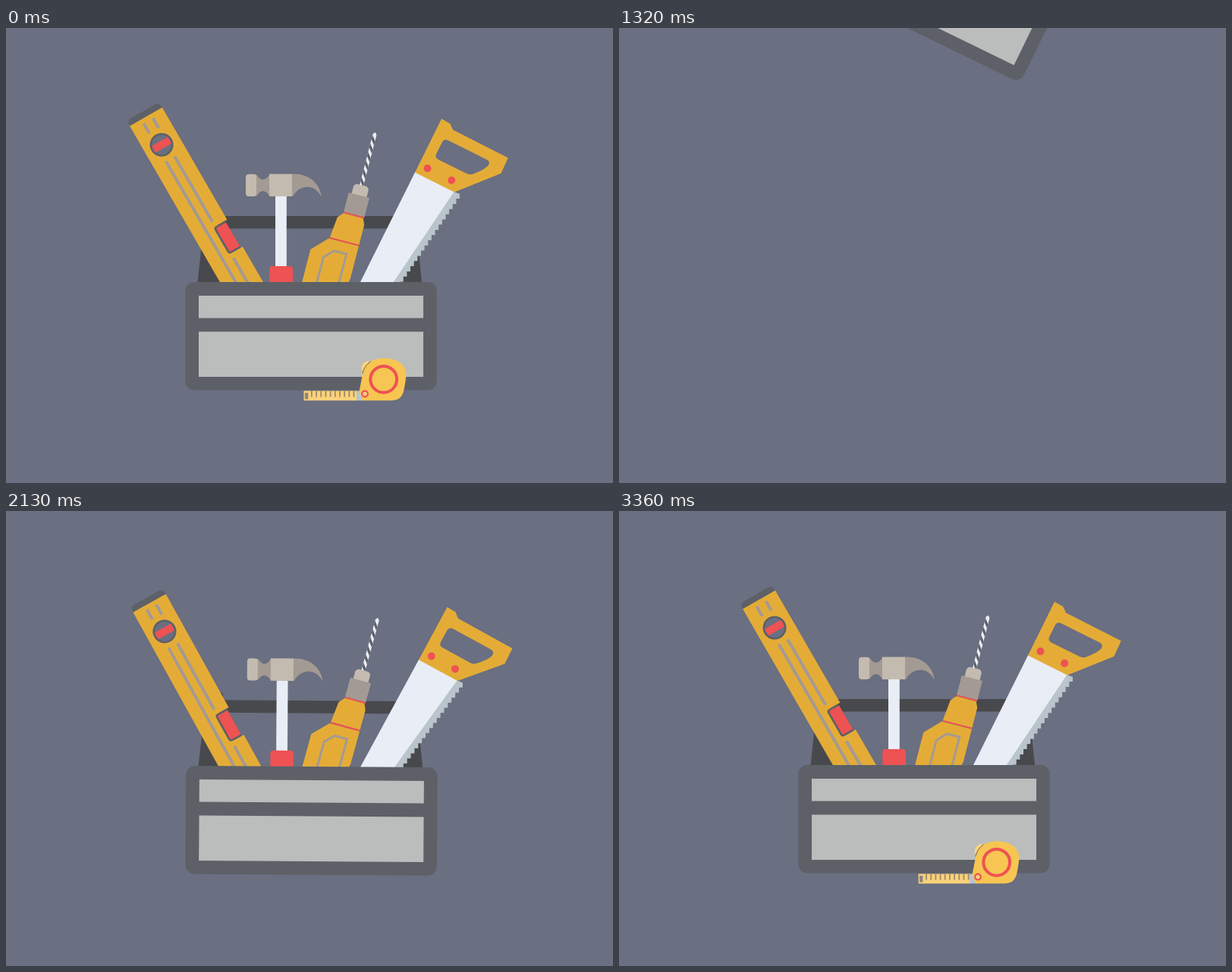
An HTML page with a canvas that plays this animation: 800 px wide and 600 px high, repeating every 3.39 s.

```html
<!DOCTYPE html>
<html lang="en">
<head>
<meta charset="utf-8">
<title>Toolbox</title>
<style>
html, body { margin: 0; width: 100%; height: 100%; overflow: hidden; background: #6a6f81; }
canvas { display: block; }
</style>
</head>
<body>
<canvas id="stage" width="800" height="600"></canvas>
<script>
const ctx = document.getElementById('stage').getContext('2d');
const LOOP = 3390, STEP = 30;
const EXIT = 720, ENTER = 1290, HOVER = 1530, SETTLE = 1860, TAPE_IN = 2250, TAPE_LAND = 2950, PULL = 2905;
const C = {
  bg: '#6a6f81', box: '#5d6067', panel: '#bbbdbc', frame: '#48494d',
  yellow: '#e4ac37', red: '#ee5253', steel: '#e9edf5', shade: '#bac4cb',
  tan: '#a39a93', sand: '#c4bbb0', gold: '#f7c552', pale: '#fbd27b'
};

// Poses are [x, y, degrees]: where a tool rests, and how far it leans before settling.
const tools = [
  { draw: drawLevel, start: 1660, home: [184.5, 117, -30], lean: [-20, -35, -6], drift: 364, spin: 20 },
  { draw: drawHammer, start: 1749, home: [362.5, 314, 0], lean: [0, 0, 0], drift: -30, spin: -29 },
  { draw: drawDrill, start: 1615, home: [458.4, 246.9, 14.5], lean: [-1.3, -3.4, -4.5], drift: 50, spin: 30 },
  { draw: drawSaw, start: 1570, home: [539, 190.5, 26.5], lean: [-28.6, -25, -15.5], drift: 100, spin: 40 }
];

const clamp = v => Math.min(1, Math.max(0, v));
const damped = (s, decay, period, push = 0) =>
  Math.exp(-s / decay) * (Math.cos(s / period) + push * Math.sin(s / period));

// The box springs in from above, hovers tilted, then drops level.
function boxPose(t) {
  const enter = damped(t - 1320, 65, 44.6);
  const tilt = damped(Math.max(0, t - SETTLE), 90, 70);
  const lift = 21 * (1 - clamp((t - HOVER) / (SETTLE - HOVER)));
  return [402 - 14 * tilt + 23 * enter, 406.5 - 55.5 * tilt - lift - 394 * enter, -10 * tilt + 36 * enter];
}

function toolPose({ start, home, lean, drift, spin }, t) {
  const left = 1 - clamp((t - start) / 200);
  const sway = damped(Math.max(0, t - SETTLE), 90, 60, 2);
  const fall = [drift, -520, spin];
  return home.map((v, i) => v + lean[i] * sway + fall[i] * left);
}

function tapePose(t) {
  const r = Math.max(0, TAPE_LAND - t) / 400;
  const glide = Math.pow(r, 1.15);
  const drop = 1060 * Math.pow(Math.max(0, r - 1), 2);
  return [497.5 + 143 * glide, 463.5 - 31.5 * Math.pow(r, 0.35) - drop, 69 * glide];
}

function place([x, y, deg], draw) {
  ctx.save();
  ctx.translate(x, y);
  ctx.rotate(deg * Math.PI / 180);
  draw();
  ctx.restore();
}

function rect(color, x, y, w, h, r = 0) {
  ctx.fillStyle = color;
  ctx.beginPath();
  ctx.roundRect(x, y, w, h, r);
  ctx.fill();
}

function shape(color, d, rule = 'nonzero') {
  ctx.fillStyle = color;
  ctx.fill(new Path2D(d), rule);
}

function line(color, width, d) {
  ctx.strokeStyle = color;
  ctx.lineWidth = width;
  ctx.stroke(new Path2D(d));
}

function circle(x, y, r, fill, stroke, width) {
  ctx.beginPath();
  ctx.arc(x, y, r, 0, 2 * Math.PI);
  if (fill) { ctx.fillStyle = fill; ctx.fill(); }
  if (stroke) { ctx.strokeStyle = stroke; ctx.lineWidth = width; ctx.stroke(); }
}

function drawHandle() {
  rect(C.frame, 275, 248, 252, 16.5);
  shape(C.frame, 'M252 340 L262.5 242 Q263 238 267 238 H280 Q284.5 238 284.5 243 L284 340 Z');
  shape(C.frame, 'M548.5 340 L538.5 242 Q538 238 534 238 H521 Q517 238 517 243 L516.5 340 Z');
}

function drawFront() {
  rect(C.box, 236.3, 335, 331.4, 142.6, 12);
  rect(C.panel, 254, 353, 296, 29.5);
  rect(C.panel, 254, 400.5, 296, 59.5);
}

function drawLevel() {
  rect(C.box, -24.5, -8, 49, 14, [6, 6, 0, 0]);
  shape(C.yellow, 'M-24.7 0 H24.7 V171 H10 V212 H24.7 V340 H-24.7 Z');
  line(C.tan, 4, 'M-7 6V21M7 6V21M-6.6 64V325M6.6 64V164M6.6 219V325');
  circle(-0.7, 42.3, 14.2, C.bg, C.box, 2.6);
  rect(C.red, -13, 37.3, 24.6, 10, 1.5);
  rect(C.box, 3.7, 171, 18, 41, [4, 0, 0, 4]);
  rect(C.red, 6.3, 173.5, 15.4, 36, [2, 0, 0, 2]);
}

function drawHammer() {
  ctx.translate(-362.5, -314);
  rect(C.sand, 316, 192.8, 14.5, 29.2, 4);
  shape(C.tan, 'M330 193 Q338.5 207 347.5 193 V222 Q338.5 208 330 222 Z');
  rect(C.sand, 347, 192.5, 30.3, 29.5);
  shape(C.tan, 'M377 192.5 C399 191.5 413 204 416 222.5 C410 213 404 209.5 397 209.5 C388 210 382 215 378 222 H377 Z');
  rect(C.steel, 355, 222, 14.8, 94);
  shape(C.red, 'M351 314 H374 Q378 314 378 318 V396 Q378 400 374 400 H351 Q347.3 400 347.3 396 V318 Q347.3 314 351 314 Z' +
    'M355 384 a7.6 7.6 0 1 0 15.2 0 a7.6 7.6 0 1 0 -15.2 0 Z', 'evenodd');
}

function drawDrill() {
  ctx.translate(-414, -181);
  ctx.save();
  ctx.clip(new Path2D('M414 68 L416.6 71 V141 H411.4 V71 Z'));
  rect(C.steel, 411, 68, 6, 73);
  for (let y = 72; y < 140; y += 11.5) shape(C.box, `M411 ${y} l6 8 v5.5 l-6 -8 Z`);
  ctx.restore();
  rect(C.sand, 404, 140, 20.5, 15, [5, 5, 0, 0]);
  rect(C.tan, 400, 153.7, 28.2, 26.3);
  rect(C.red, 400, 179.7, 28, 2.3);
  shape(C.yellow, 'M400 181.8 H427 L430.5 190 V217 H390.7 L393.7 189 Z');
  rect(C.red, 390.7, 216.8, 39.8, 2.2);
  shape(C.yellow, 'M389.5 219 H430.5 V263 L426 282 V345 H370 V239 Z');
  line(C.tan, 3, 'M389 325 V244.5 L400.5 233 H417.4 V325');
}

function drawSaw() {
  let blade = 'M56 0 L65.4 -1';
  for (let y = -1.5; y < 245; y += 8.2) blade += `L${65 - 0.134 * y} ${y} l3 6.1`;
  shape(C.shade, blade + 'L25 250 Z');
  shape(C.steel, 'M0 -1 H57.5 L25.5 250 H0 Z');
  shape(C.yellow, 'M-0.3 -79 L12.6 -78.4 L19.7 -72.6 L101.3 -72 L102 -49.5 L58 0 H0 Z' +
    'M20 -57.4 H76 Q83.5 -57.4 82.3 -51 Q80 -43 69 -32 Q66 -29 61 -29 H20 Q14.2 -29 14.2 -35 V-51 Q14.2 -57.4 20 -57.4 Z', 'evenodd');
  circle(12.3, -12.2, 5, C.red);
  circle(47.8, -12.3, 5, C.red);
}

function drawTape(pull) {
  ctx.translate(-497.5, -463.5);
  const end = 462 - pull;
  if (pull > 0) {
    ctx.save();
    ctx.beginPath();
    ctx.rect(end, 478, 463 - end, 14);
    ctx.clip();
    rect(C.pale, end, 478.6, pull + 4, 12.6);
    rect('#8a8781', end + 1.6, 481, 4.4, 8.5);
    for (let x = end + 10.6; x < 462; x += 6.18) rect('#9c8b68', x - 0.9, 478.6, 1.8, 7.8);
    ctx.restore();
  }
  rect(C.shade, 462, 478.6, 10, 12.6);
  shape(C.pale, 'M470 457 L468.6 448 Q469.5 439 480 439 L484 444 Z');
  shape(C.gold, 'M470 491.2 L465.6 479 L470.5 454 C474 442 484 435.5 497 435.5 C516 435.5 527.3 444 527.3 457 C527.2 463 525.5 472 524.3 478 C522 487.5 517 491.2 507 491.2 Z');
  line(C.box, 1, 'M469.8 455.5 Q472.5 445 480.5 439.8');
  circle(497.7, 463.3, 17.4, null, C.red, 4);
  circle(473, 482.5, 3.8, C.pale, C.red, 2.2);
}

function render(t) {
  // Until the new box enters, the settled scene of the previous loop is on show.
  const leaving = t < ENTER;
  const time = leaving ? t + LOOP : t;
  const shift = leaving ? 127 * Math.pow(Math.max(0, t - EXIT) / 270, 3) : 0;

  ctx.fillStyle = C.bg;
  ctx.fillRect(0, 0, 800, 600);
  ctx.save();
  ctx.translate(shift, 0);
  place(boxPose(time), () => {
    ctx.translate(-402, -406.5);
    drawHandle();
    for (const tool of tools) {
      if (time >= tool.start) place(toolPose(tool, time), tool.draw);
    }
    drawFront();
  });
  if (time >= TAPE_IN) {
    const rest = 1 - clamp((time - PULL) / 700);
    place(tapePose(time), () => drawTape(77 * (1 - rest * rest)));
  }
  ctx.restore();
}

const start = performance.now();
function tick() {
  const t = (performance.now() - start) % LOOP;
  render(Math.floor(t / STEP) * STEP);
  requestAnimationFrame(tick);
}
tick();
</script>
</body>
</html>
```
